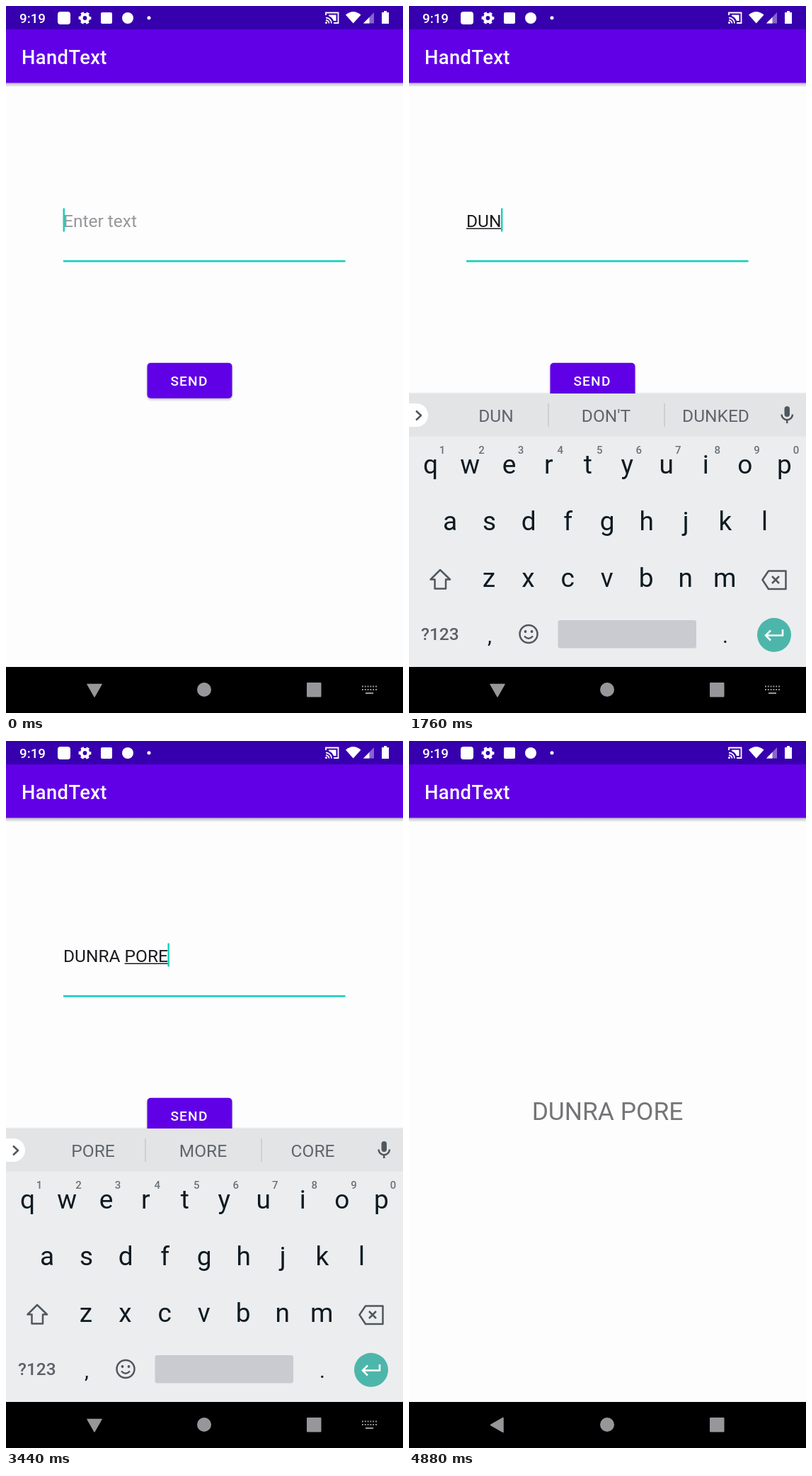
Animation, 561 px wide and 998 px high, one loop 4960 ms. Source, as an HTML page:

```html
<!DOCTYPE html>
<html lang="en">
<head>
<meta charset="utf-8">
<title>Text form</title>
<style>
html, body { margin: 0; height: 100%; overflow: hidden; background: #fdfdfd; }
svg { display: block; width: 561px; height: 998px; font-family: Roboto, sans-serif; }
text { white-space: pre; }
.mid text, text.mid { text-anchor: middle; }
.med { font-weight: 500; }
.line { fill: none; stroke: #4f575d; stroke-width: 2.5; stroke-linejoin: round; }
.field { font-size: 24.5px; }
.words { font-size: 24.5px; fill: #5f656a; }
.keys { font-size: 37px; fill: #0d1b21; }
.marks { font-size: 30px; fill: #0d1b21; }
.digits { font-size: 15px; font-weight: 500; fill: #6c7176; }
</style>
</head>
<body>
<svg viewBox="0 0 561 998">
  <defs>
    <linearGradient id="fade" x2="0" y2="1">
      <stop offset="0" stop-color="#000" stop-opacity=".26"/>
      <stop offset="1" stop-color="#000" stop-opacity="0"/>
    </linearGradient>
    <clipPath id="reveal"><rect id="revealBox" width="561" height="998"/></clipPath>
    <filter id="drop" x="-10%" y="-10%" width="120%" height="140%">
      <feDropShadow dx="0" dy="2" stdDeviation="1.5" flood-opacity=".25"/>
    </filter>
    <g id="base">
      <rect width="561" height="998" fill="#fdfdfd"/>
      <rect y="108.6" width="561" height="6" fill="url(#fade)"/>
      <rect width="561" height="108.6" fill="#6100e6"/>
      <text class="med" x="22" y="82" font-size="27.3" letter-spacing=".4" fill="#fff">HandText</text>
    </g>
  </defs>

  <g id="form">
    <use href="#base"/>
    <text id="hint" class="field" x="81" y="311.5" fill="#98979c">Enter text</text>
    <text id="typed" class="field" x="81" y="311.5" fill="#1c1b20"></text>
    <rect id="compose" y="313.5" height="1.5" fill="#1c1b20"/>
    <rect id="cursor" y="285.5" width="2.5" height="33" fill="#1bcfbd"/>
    <rect x="81" y="358.8" width="398.5" height="2.7" fill="#14d0bd"/>
    <rect x="199.5" y="503.7" width="120" height="50" rx="5" fill="#6100e6" filter="url(#drop)"/>
    <text class="med" x="232.4" y="536" font-size="19.1" letter-spacing="1.2" fill="#fff">SEND</text>
  </g>

  <g id="result" clip-path="url(#reveal)">
    <g id="resultPage">
      <use href="#base"/>
      <text id="message" class="mid" x="280.5" y="535" font-size="35.4" fill="#757578"></text>
    </g>
  </g>

  <g id="status" fill="#fff">
    <rect width="561" height="33" fill="#3700ae"/>
    <text class="med" x="19" y="23.5" font-size="18.8">9:19</text>
    <rect x="73" y="8" width="18" height="18" rx="4"/>
    <g fill="none" stroke="#fff">
      <circle cx="111.5" cy="17" r="4.9" stroke-width="4"/>
      <circle cx="111.5" cy="17" r="7.4" stroke-width="3" stroke-dasharray="4.2 3.55" stroke-dashoffset="2.1"/>
    </g>
    <rect x="134" y="9" width="16" height="16" rx="2"/>
    <circle cx="172" cy="17" r="8"/>
    <circle cx="202" cy="16.7" r="2.5"/>
    <path d="M452 13V9.5H469.5V24H463M452 16.5A8 8 0 0 1 460 24.5M452 20A4.5 4.5 0 0 1 456.5 24.5"
      fill="none" stroke="#fff" stroke-width="1.8"/>
    <path d="M456 12.5H466.5V21H463A12 12 0 0 0 456 14Z"/>
    <circle cx="452.5" cy="23.5" r="1.5"/>
    <path d="M480 12.5Q490.5 3.5 501.5 12.5L490.7 24.5Z"/>
    <path d="M505 24.5L520 9V24.5Z" opacity=".4"/>
    <path d="M505 24.5L513.5 15.7V24.5Z"/>
    <path d="M534 7H538V9H541V25H531V9H534Z"/>
  </g>

  <g id="nav" fill="#97979b">
    <rect y="933" width="561" height="65" fill="#000"/>
    <path id="back" d="M115 957.5H135L125 975Z" stroke="#97979b" stroke-width="1.5" stroke-linejoin="round"/>
    <circle cx="280" cy="965" r="10"/>
    <rect x="425" y="955" width="20.5" height="20.5" rx="1"/>
    <g id="switcher" stroke="#97979b" stroke-width="2" stroke-dasharray="2 1.8">
      <path d="M503 960.5H524M503 965H524"/>
      <path d="M508 970H519" stroke-dasharray="none"/>
    </g>
  </g>

  <g id="keyboard">
    <rect y="545.5" width="561" height="2" fill="#000" opacity=".05"/>
    <rect y="547" width="561" height="386" fill="#ecedef"/>
    <rect y="547" width="561" height="60.5" fill="#e3e4e6"/>
    <rect x="-20" y="561" width="47" height="33" rx="16.5" fill="#fff"/>
    <path class="line" d="M10 571.5L17 578L10 584.5"/>
    <path d="M197 561V594M361 561V594" stroke="#c6c9cc" stroke-width="1.5"/>
    <g class="words mid" id="words"></g>
    <rect x="530.5" y="565" width="7.5" height="15" rx="3.7" fill="#50585e"/>
    <path class="line" d="M526.5 576.5A7.7 7.7 0 0 0 542 576.5M534.2 584V589"/>
    <g class="keys mid" id="keys"></g>
    <g class="marks mid" id="marks"></g>
    <g class="digits mid" id="digits"></g>
    <path class="line" d="M44 796L30.5 809.5H36.5V822.5H52V809.5H58Z"/>
    <path class="line" d="M499.5 810L508 797.5H532.5V823H508ZM513 805L523 815M523 805L513 815"/>
    <text class="med" x="17" y="895" font-size="24.5" fill="#5b6167">?123</text>
    <circle class="line" cx="169" cy="886.5" r="12.5"/>
    <circle cx="164.5" cy="883" r="1.9" fill="#4f575d"/>
    <circle cx="173.5" cy="883" r="1.9" fill="#4f575d"/>
    <path class="line" d="M163 889.5Q169 896 175 889.5"/>
    <rect x="210.5" y="867" width="195.5" height="39.5" rx="3" fill="#c9cbd0"/>
    <circle cx="516" cy="887.8" r="24" fill="#4db6ab"/>
    <path d="M528 880V888.5H505M511 881.5L504 888.5L511 895.5" fill="none" stroke="#fff" stroke-width="2.6"/>
  </g>
</svg>

<script>
const LOOP = 4960, STEP = 80;
const NAME = 'DUNRA PORE';
const KEY_TIMES = [1200, 1440, 1680, 1840, 2080, 2240, 2400, 2640, 2880, 3120];
const SUGGESTIONS = [
  'thanks I we', "D DO DON'T", 'DU DUE DUTY', "DUN DON'T DUNKED", 'DUNR DUNE DUNES',
  'DUNRA DUNES DUNKED', 'AND IS THE', 'P PM PLEASE', 'PO TO SO', 'POR FOR PORT', 'PORE MORE CORE'
].map(s => s.split(' '));

const $ = id => document.getElementById(id);
const clamp = x => Math.min(1, Math.max(0, x));
const show = (el, on) => el.setAttribute('visibility', on ? 'visible' : 'hidden');
const move = (el, y) => el.setAttribute('transform', `translate(0 ${y})`);

function label(parent, str, x, y) {
  const t = document.createElementNS('http://www.w3.org/2000/svg', 'text');
  t.setAttribute('x', x);
  t.setAttribute('y', y);
  t.textContent = str;
  $(parent).append(t);
  return t;
}

const row = (id, chars, x, y) => [...chars].forEach((c, i) => label(id, c, x + 55.55 * i, y));
row('keys', 'qwertyuiop', 30.5, 660);
row('keys', 'asdfghjkl', 58, 740);
row('keys', 'zxcvbnm', 113, 820);
row('digits', '1234567890', 47, 632);
label('marks', ',', 114, 899);
label('marks', '.', 447, 899);
const words = [123, 278.5, 433.5].map(x => label('words', '', x, 586.5));
$('message').textContent = NAME;

let count = -1;
function type(n) {
  if (n === count) return;
  count = n;
  const text = NAME.slice(0, n), typed = $('typed');
  typed.textContent = text;
  const width = k => k ? typed.getSubStringLength(0, k) : 0;
  const start = text.lastIndexOf(' ') + 1;
  const from = width(start), end = width(n);
  $('compose').setAttribute('x', 81 + from);
  $('compose').setAttribute('width', end - from);
  $('cursor').setAttribute('x', 80.5 + end);
  words.forEach((w, i) => w.textContent = SUGGESTIONS[n][i]);
}

function draw(t) {
  type(KEY_TIMES.filter(k => k <= t).length);
  show($('hint'), count === 0);
  show($('cursor'), t < 3620);

  // keyboard slides and fades in, later out
  const inP = 1 - (1 - clamp((t - 285) / 250)) ** 2;
  const outP = clamp((t - 4080) / 200) ** 2;
  const up = inP * (1 - outP);
  move($('keyboard'), 119 * (1 - up));
  $('keyboard').setAttribute('opacity', up);

  // second screen is uncovered from the bottom
  const open = 1 - (1 - clamp((t - 3680) / 380)) ** 3;
  show($('result'), open > 0);
  move($('form'), -20 * open);
  move($('resultPage'), 41 * (1 - open));
  $('revealBox').setAttribute('y', 933 * (1 - open));

  const turn = 90 * clamp((t - 3920) / 160);
  $('back').setAttribute('transform', `rotate(${turn} 125 965.5)`);
  show($('switcher'), t < 4000);
}

function tick() {
  const t = performance.now() % LOOP;
  draw(Math.floor(t / STEP) * STEP);
  requestAnimationFrame(tick);
}
tick();
</script>
</body>
</html>
```
